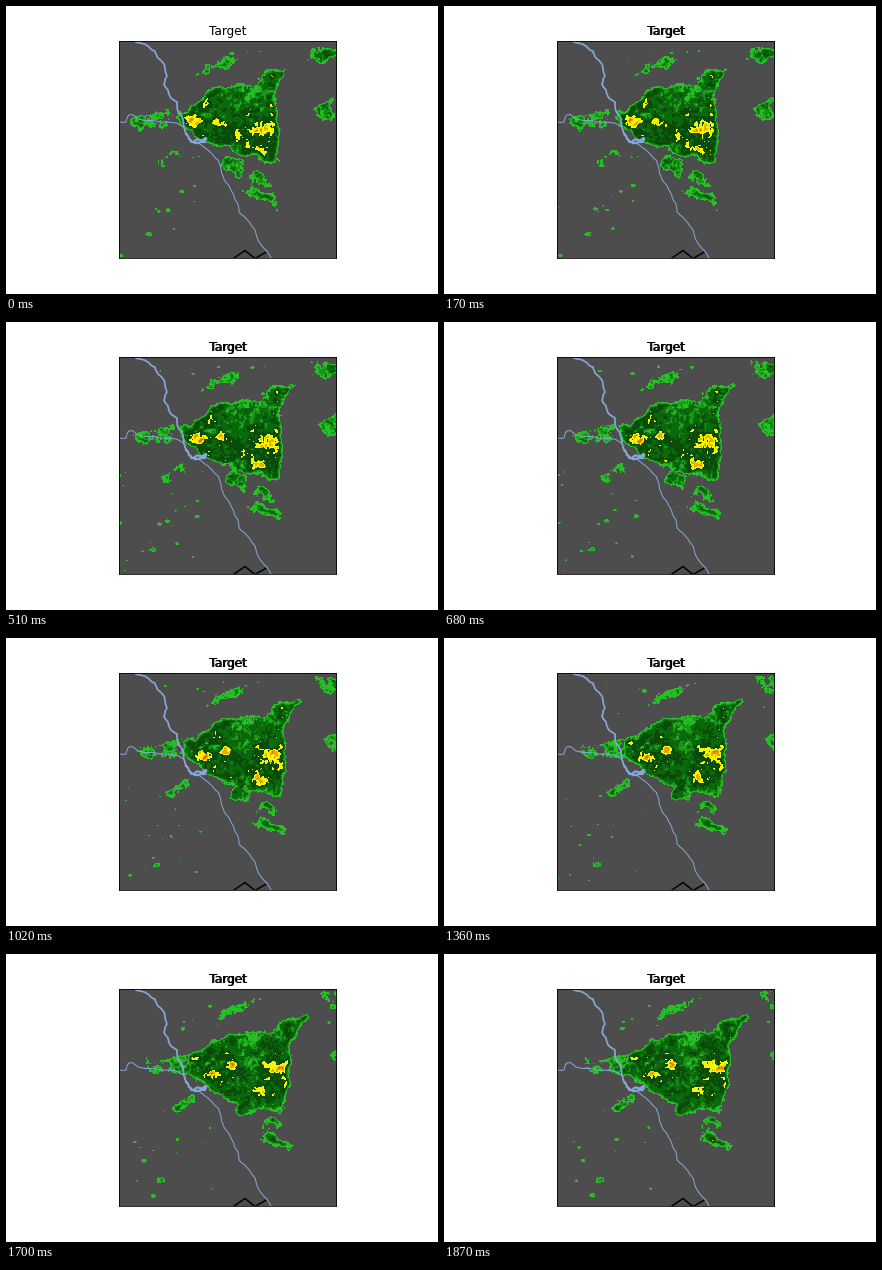
Animation of 432x288 px, one loop 2040 ms. Source, as a matplotlib script:

```python
import numpy as np
import matplotlib.pyplot as plt
from matplotlib.animation import FuncAnimation
from matplotlib.colors import BoundaryNorm, ListedColormap

plt.rcParams["font.family"] = "DejaVu Sans"

W, H, DPI = 432, 288, 72
LEFT, TOP, SIZE = 112.68, 34.56, 217.44
CELLS = 217
FRAMES, INTERVAL = 12, 170

LEVELS = [-1000, 31, 59, 74, 100, 133, 160, 181, 219, 1000]
COLORS = ["#4d4d4d", "#28be28", "#199619", "#0a690a", "#0a4b0a",
          "#f5f500", "#edac00", "#f06e00", "#a00000"]
WATER = "#86a8d8"

# corners of the main storm at the start and end of the loop
STORM_START = np.array([(172, 117), (203, 86), (274, 66), (273, 158), (220, 148)])
STORM_END = np.array([(177, 120), (203, 87), (297, 66), (276, 158), (238, 162)])

# x, y, radii, tilt, peak, change of peak over the loop
SHOWERS = [
    (255, 190, 20, 7, 25, 102, 8),
    (249, 174, 11, 5, 0, 76, 8),
    (224, 160, 10, 8, 0, 62, 35),
    (150, 116, 22, 8, 0, 50, -10),
    (316, 48, 18, 7, 0, 76, -40),
    (322, 103, 7, 9, -40, 66, -30),
    (211, 60, 13, 4, -20, 56, -5),
    (143, 228, 5, 4, 0, 72, 15),
    (168, 155, 8, 4, 0, 22, 34),
]

# x, y at start; x, y at end; radii of the heaviest rain
CORES = [
    (188, 114, 207, 123, 11, 6),
    (250, 123, 270, 113, 13, 7),
    (265, 95, 284, 90, 5, 7),
    (252, 147, 251, 139, 7, 6),
    (256, 190, 278, 188, 11, 4),
    (213, 117, 226, 111, 7, 4),
]

rng = np.random.default_rng(11)
lattices = rng.uniform(-1, 1, (8, 256, 256))
steps = (np.arange(CELLS) + 0.5) * SIZE / CELLS
X, Y = np.meshgrid(LEFT + steps, TOP + steps)


def noise(layer, x, y, scale):
    """Smooth value noise on a wrapped lattice."""
    u, v = x / scale, y / scale
    i, j = np.floor(u).astype(int), np.floor(v).astype(int)
    u, v = u - i, v - j
    u, v = u * u * (3 - 2 * u), v * v * (3 - 2 * v)
    at = lambda a, b: lattices[layer][b % 256, a % 256]
    upper = at(i, j) * (1 - u) + at(i + 1, j) * u
    lower = at(i, j + 1) * (1 - u) + at(i + 1, j + 1) * u
    return upper * (1 - v) + lower * v


def texture(k):
    """Drifting noise that slowly turns from one pattern into another."""
    x, turn = X - 1.6 * k, 0.12 * k
    total = 0
    for layer, (scale, weight) in enumerate([(11, 1), (5, 0.9), (2, 0.8)]):
        total = total + weight * (np.cos(turn) * noise(2 * layer, x, Y, scale)
                                  + np.sin(turn) * noise(2 * layer + 1, x, Y, scale))
    return 28 * total


def wind(x, y, t):
    """Showers drift east, faster in the north, and slightly upwards."""
    return x + t * (13 + 0.1 * max(120 - y, 0)), y - 4 * t


def ellipse(x, y, cx, cy, rx, ry, tilt=0):
    """Distance from the centre, 1 on the rim."""
    c, s = np.cos(np.radians(tilt)), np.sin(np.radians(tilt))
    dx, dy = x - cx, y - cy
    return np.hypot((c * dx + s * dy) / rx, (c * dy - s * dx) / ry)


def depth_in(corners, x, y):
    """Signed distance into a convex polygon."""
    depth = np.full(x.shape, np.inf)
    for (ax_, ay_), (bx, by) in zip(corners, np.roll(corners, -1, axis=0)):
        ex, ey = bx - ax_, by - ay_
        depth = np.minimum(depth, (ex * (y - ay_) - ey * (x - ax_)) / np.hypot(ex, ey))
    return depth


def ramp(depth, peak):
    return np.clip(31 + 16 * depth, -90, peak)


def make_specks():
    west = rng.uniform((108, 145), (200, 252), (40, 2))
    north = rng.uniform((150, 42), (320, 80), (18, 2))
    places = np.vstack([west, north])
    return [(x, y, rng.uniform(0.8, 2.3), rng.uniform(-2, 14)) for x, y in places]


SPECKS = make_specks()


def specks(k):
    field = np.full(X.shape, -90.0)
    for x, y, radius, peak_time in SPECKS:
        size = radius * (1 - abs(k - peak_time) / 4.5)
        if size > 0:
            cx, cy = wind(x, y, (k - 5) / FRAMES)
            field = np.maximum(field, ramp(size - ellipse(X, Y, cx, cy, 1.4, 1), 62))
    return field


def rain(k):
    t = k / (FRAMES - 1)
    x = X + 6 * noise(6, X - 1.6 * k, Y, 13)
    y = Y + 6 * noise(7, X - 1.6 * k, Y, 13)

    bump = 0
    for x0, y0, x1, y1, rx, ry in CORES:
        d = ellipse(X, Y, x0 + (x1 - x0) * t, y0 + (y1 - y0) * t, rx, ry)
        bump = np.maximum(bump, 44 * np.exp(-d ** 4))
    gap = 30 * np.exp(-ellipse(X, Y, *wind(245, 85, t), 26, 9, -12) ** 2)

    corners = STORM_START + (STORM_END - STORM_START) * t
    field = ramp(depth_in(corners, x, y), 99 + bump - gap)
    for cx, cy, rx, ry, tilt, peak, trend in SHOWERS:
        depth = (1 - ellipse(x, y, *wind(cx, cy, t), rx, ry, tilt)) * min(rx, ry)
        field = np.maximum(field, ramp(depth, peak + trend * t + bump))
    return np.maximum(field + texture(k), specks(k))


def meander(points, wobble):
    """Polyline with seeded jitter between its given points."""
    points = np.array(points, float)
    for _ in range(2):
        middle = (points[:-1] + points[1:]) / 2
        middle += rng.uniform(-wobble, wobble, middle.shape)
        merged = np.empty((len(points) + len(middle), 2))
        merged[::2], merged[1::2] = points, middle
        points, wobble = merged, wobble * 0.7
    return points


fig = plt.figure(figsize=(W / DPI, H / DPI), dpi=DPI, facecolor="white")
ax = fig.add_axes([LEFT / W, 1 - (TOP + SIZE) / H, SIZE / W, SIZE / H],
                  facecolor=COLORS[0])
image = ax.imshow(rain(0), extent=(LEFT, LEFT + SIZE, TOP + SIZE, TOP),
                  cmap=ListedColormap(COLORS), norm=BoundaryNorm(LEVELS, len(COLORS)),
                  interpolation="nearest", aspect="auto")
ax.set(xlim=(LEFT, LEFT + SIZE), ylim=(TOP + SIZE, TOP), xticks=[], yticks=[])


def draw_line(points, width, color=WATER, wobble=0.9):
    path = meander(points, wobble)
    ax.plot(path[:, 0], path[:, 1], color=color, lw=width, zorder=2.2)


draw_line([(130, 36), (138, 38), (144, 42), (149, 45), (152, 52), (158, 58),
           (161, 70), (158, 78), (162, 84), (165, 92), (171, 96), (172, 105),
           (177, 113), (178, 122), (181, 129)], 1.7, wobble=0.7)
draw_line([(113, 116), (120, 116), (122, 110), (127, 109), (132, 113),
           (150, 115), (170, 117), (178, 121)], 1)
draw_line([(180, 128), (183, 133), (188, 136), (194, 134), (200, 132), (199, 136),
           (191, 137), (185, 135)], 2.2, wobble=1.5)
draw_line([(192, 137), (205, 147), (213, 155), (215, 163), (219, 175), (225, 184),
           (230, 195), (233, 206), (244, 217), (250, 228), (256, 240), (265, 252)], 1)
draw_line([(228, 252), (239, 244.5), (249, 252.5), (259.5, 246.5)], 1.5, "black", 0)

title = ax.set_title("Target", size=12, pad=6)
overprint = ax.text(LEFT + SIZE / 2 + 1, TOP - 6, "Target", size=12,
                    ha="center", va="baseline")


def update(k):
    image.set_data(rain(k))
    overprint.set_visible(k > 0)
    return [image, title, overprint]


anim = FuncAnimation(fig, update, frames=FRAMES, interval=INTERVAL,
                     repeat=True, repeat_delay=0, blit=False)
plt.show()
```
